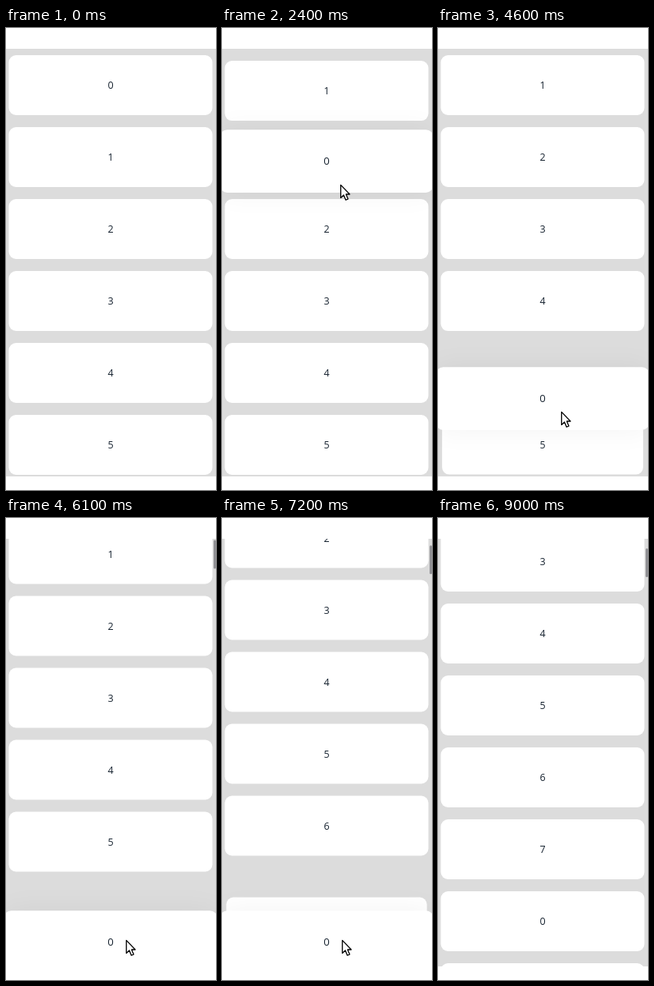
Write an HTML page with a canvas that moves like this. It is 263x578 px and loops after 9400 ms.

```html
<!DOCTYPE html>
<html lang="en">
<head>
<meta charset="utf-8">
<title>Drag to reorder</title>
<style>
  html, body { margin: 0; width: 100%; height: 100%; overflow: hidden; background: #fff; }
  canvas { display: block; width: 263px; height: 578px; }
</style>
</head>
<body>
<canvas id="stage"></canvas>
<script>
const W = 263, H = 578, LOOP = 9400, STEP = 100;
const TOP = 26, BOTTOM = 561;
const PITCH = 90, FIRST = 71.5, MID = 131;
const CARD_W = 255, CARD_H = 75, RADIUS = 9;
const ARRIVE = 200, LIFT = 1520, SCROLL = 5835, DROP = 7900, TWITCH = 8900, LEAVE = 9000;

// Key points of the drag: the pointer runs ahead and the card catches up
const drag = [
  { t: 1600, card: 71.5, x: 130, y: 69 },
  { t: 2190, card: 116.5, x: 143, y: 140 },
  { t: 2400, card: 166.5, x: 148, y: 195 },
  { t: 3600, card: 296.5, x: 151, y: 322 },
  { t: 4600, card: 463.5, x: 154, y: 479 },
  { t: 5900, card: 530.5, x: 150, y: 527 }
];

const canvas = document.getElementById('stage');
const ctx = canvas.getContext('2d');
const dpr = window.devicePixelRatio || 1;
canvas.width = W * dpr;
canvas.height = H * dpr;

const clamp = (x, lo, hi) => Math.min(hi, Math.max(lo, x));
const mix = (a, b, p) => a + (b - a) * p;
const progress = (t, from, length) => clamp((t - from) / length, 0, 1);
const easeOut = p => 1 - (1 - p) ** 3;
const easeInOut = p => p * p * (3 - 2 * p);

// Critically damped spring from 0 to 1
function spring(ms) {
  const x = Math.max(0, ms) * 0.02;
  return 1 - (1 + x) * Math.exp(-x);
}

function dragAt(t, key) {
  const i = clamp(drag.findIndex(k => k.t >= t), 1, drag.length - 1);
  const a = t > drag[drag.length - 1].t ? drag[drag.length - 1] : drag[i - 1];
  const b = t > drag[drag.length - 1].t ? a : drag[i];
  return mix(a[key], b[key], progress(t, a.t, b.t - a.t || 1));
}

const scrollAt = t =>
  clamp((t - SCROLL) * 0.1, 0, 179) + 18 * easeOut(progress(t, DROP - STEP, 700));
const slotY = (n, t) => FIRST + PITCH * n - scrollAt(t);

// A card gives way once the dragged one is half a slot past its place
const swaps = [];
for (let t = 0; t < DROP; t += 10) {
  if (dragAt(t, 'card') - slotY(swaps.length, t) >= PITCH / 2) swaps.push(t);
}

function cursorAt(t) {
  const p = easeInOut(progress(t, ARRIVE, 400));
  const away = t >= TWITCH ? 1 : 0;
  return [
    mix(188, dragAt(t, 'x'), p) + 9 * away,
    mix(479, dragAt(t, 'y'), p) - 9 * progress(t, DROP, 600) + 21 * away
  ];
}

function drawCard(label, y, scale, lift) {
  ctx.save();
  ctx.translate(MID, y);
  ctx.scale(scale, scale);
  ctx.save();
  if (lift > 0) {
    ctx.shadowColor = `rgba(0,0,0,${0.05 * lift})`;
    ctx.shadowBlur = 36 * dpr;
  }
  ctx.fillStyle = '#fff';
  ctx.beginPath();
  ctx.roundRect(-CARD_W / 2, -CARD_H / 2, CARD_W, CARD_H, RADIUS);
  ctx.fill();
  ctx.restore();
  ctx.fillStyle = '#182431';
  ctx.font = '12.5px "Open Sans", "Noto Sans", sans-serif';
  ctx.textAlign = 'center';
  ctx.fillText(label, 0, 4.5);
  ctx.restore();
}

function drawCursor([x, y]) {
  ctx.save();
  ctx.translate(Math.round(x), Math.round(y));
  ctx.fillStyle = '#fff';
  ctx.strokeStyle = '#000';
  ctx.lineWidth = 1.3;
  ctx.lineJoin = 'round';
  const arrow = new Path2D('M.7 1.4V17.4L4.4 14L7 20.2L9.9 19L7.3 13H11.9Z');
  ctx.fill(arrow);
  ctx.stroke(arrow);
  ctx.restore();
}

function draw(t) {
  const settle = spring(t - DROP);
  const slot = swaps.filter(s => t >= s).length;
  const home = slotY(slot, t);
  const heldY = mix(dragAt(t, 'card'), home, settle);
  const lift = easeOut(progress(t, LIFT, 200)) * (1 - settle);
  const offset = (heldY - home) / PITCH;
  const neighbor = offset > 0 ? slot + 1 : slot;

  ctx.setTransform(dpr, 0, 0, dpr, 0, 0);
  ctx.fillStyle = '#fff';
  ctx.fillRect(0, 0, W, H);

  ctx.save();
  ctx.beginPath();
  ctx.rect(0, TOP, W, BOTTOM - TOP);
  ctx.clip();
  ctx.fillStyle = '#dcdcdc';
  ctx.fillRect(0, TOP, W, BOTTOM - TOP);
  for (let n = 1; n < 10; n++) {
    const moved = n <= slot ? spring(t - swaps[n - 1]) : 0;
    const scale = n === neighbor ? 1 - 0.1 * Math.min(0.25, offset * offset) : 1;
    drawCard(n, slotY(n - moved, t), scale, 0);
  }
  drawCard(0, heldY, 1 + 0.05 * lift, lift);
  if (t > SCROLL) {
    ctx.fillStyle = '#919195';
    ctx.beginPath();
    ctx.roundRect(260, TOP + scrollAt(t) * 0.061, 3, 36, 1.5);
    ctx.fill();
  }
  ctx.restore();

  if (t >= ARRIVE && t < LEAVE) drawCursor(cursorAt(t));
}

const start = performance.now();
function tick() {
  const t = (performance.now() - start) % LOOP;
  draw(Math.floor(t / STEP) * STEP);
  requestAnimationFrame(tick);
}
tick();
</script>
</body>
</html>
```
